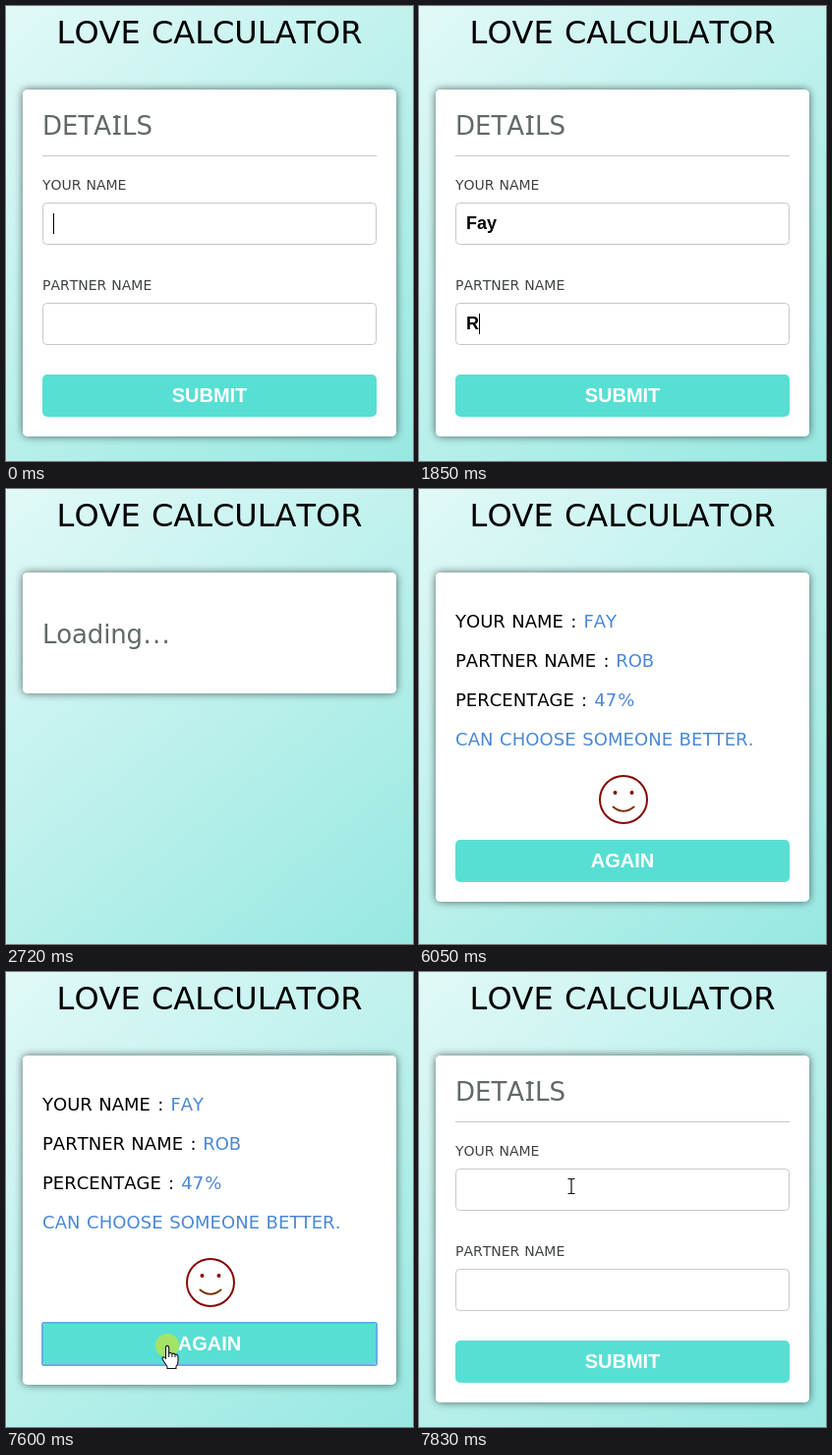
Recreate the animation shown at these times as an HTML page. Size 414 by 463 pixels, loop 7.91 s.

```html
<!DOCTYPE html>
<html lang="en">
<head>
<meta charset="utf-8">
<title>Love calculator</title>
<style>
  html, body { margin: 0; width: 100%; height: 100%; overflow: hidden; }
  body { background: linear-gradient(140deg, #e1f9f7, #97e8e1); }
  svg { display: block; width: 100%; height: 100%; }
  text { font-family: "DejaVu Sans", Verdana, sans-serif; font-kerning: none; word-spacing: .034em; white-space: pre; }
  .title { font-size: 32px; text-anchor: middle; }
  .head { font-size: 26px; fill: #626a68; }
  .label { font-size: 14px; fill: #3f4442; }
  .row { font-size: 18px; }
  .value { font-size: 18px; fill: #4a88d6; }
  .input { font: bold 18px "Liberation Sans", Arial, sans-serif; }
  .action { font: bold 20px "Liberation Sans", Arial, sans-serif; fill: #fff; text-anchor: middle; }
  .box { fill: #fff; stroke: #c8c8c8; }
  .ring { fill: none; stroke: #66aeea; stroke-width: 2; }
  .face { fill: none; stroke: #820a04; stroke-width: 2; stroke-linecap: round; }
  .pointer { fill: #fff; stroke: #111; stroke-width: 1.1; stroke-linejoin: round; }
</style>
</head>
<body>
<svg viewBox="0 0 414 463">
  <defs>
    <filter id="shadow" filterUnits="userSpaceOnUse" x="0" y="60" width="414" height="403">
      <feDropShadow dx="0" dy="0" stdDeviation="4.5" flood-color="#000" flood-opacity=".6"/>
    </filter>
  </defs>
  <text class="title" x="207" y="38">LOVE CALCULATOR</text>
  <rect id="card" x="17" y="85" width="380" height="353" rx="5" fill="#fff" filter="url(#shadow)"/>

  <g id="form">
    <text class="head" x="37" y="131">DETA<tspan dx="1.6">I</tspan><tspan dx="1.6">LS</tspan></text>
    <path d="M109 113h7.6M109 130h7.6" stroke="#626a68" stroke-width="2"/>
    <path d="M37 152.5H377" stroke="#c8c8c8"/>
    <text class="label" x="37" y="187">YOUR NAME</text>
    <rect class="box" x="37.5" y="200.5" width="339" height="42" rx="4"/>
    <text class="input" id="first" x="48" y="227"></text>
    <text class="label" x="37" y="289">PARTNER NAME</text>
    <rect class="box" x="37.5" y="302.5" width="339" height="42" rx="4"/>
    <text class="input" id="second" x="48" y="329"></text>
    <rect id="caret" width="1" height="21"/>
  </g>

  <text id="loading" class="head" x="37" y="157" letter-spacing="-.17">Loading<tspan letter-spacing="1.2" dx=".6">...</tspan></text>

  <g id="result">
    <text class="row" x="37" y="141">YOUR NAME <tspan dx="1">:</tspan></text>
    <text class="value" x="167.4" y="141">FAY</text>
    <text class="row" x="37" y="181">PARTNER NAME <tspan dx="1">:</tspan></text>
    <text class="value" x="200.2" y="181">ROB</text>
    <text class="row" x="37" y="221">PERCENTAGE <tspan dx="1">:</tspan></text>
    <text class="value" x="178.3" y="221">47<tspan dx="1">%</tspan></text>
    <text class="value" x="37" y="261" letter-spacing=".08">CAN CHOOSE SOMEONE BETTER.</text>
    <g class="face">
      <circle cx="208" cy="316" r="24"/>
      <path d="M197.5 323.5Q208 332 218.5 323.5" stroke="#7c3208"/>
      <circle cx="199.5" cy="309" r="2" fill="#820a04" stroke="none"/>
      <circle cx="216.5" cy="309" r="2" fill="#820a04" stroke="none"/>
    </g>
  </g>

  <g id="button">
    <rect x="37" y="375" width="340" height="43" rx="5" fill="#58dfd3"/>
    <text class="action" id="caption" x="207" y="403"></text>
    <rect class="ring" id="ring" x="37" y="375" width="340" height="43" rx="1.5"/>
  </g>

  <circle id="spot" cx="164" cy="380" r="12" fill="#a8e45f" fill-opacity=".95"/>
  <g id="cursor">
    <path id="arrow" class="pointer" d="M0 0V16L3.8 12.5L6.4 18.5L9 17.4L6.5 11.6H11.6Z"/>
    <g id="hand">
      <path class="pointer" d="M-1.5 1.5Q0 -.8 1.7 1.5V8Q3.3 6.6 4.9 8.5Q6.6 7.4 8 9.3Q10.7 8.6 11 11.5V16Q11 19 9 21.5V23.5H0V21.5L-4.7 14.5Q-5.6 12.2 -3.8 11.8Q-2.6 11.8 -1.5 13.5Z"/>
      <path d="M1.7 8V12M4.9 8.5V12M8 9.3V12" stroke="#111" fill="none"/>
    </g>
    <path id="beam" d="M-3.5 -7.5H-1Q0 -7.5 0 -6.5Q0 -7.5 1 -7.5H3.5M0 -6.5V6.5M-3.5 7.5H-1Q0 7.5 0 6.5Q0 7.5 1 7.5H3.5" stroke="#111" stroke-width="1.2" fill="none"/>
  </g>
</svg>
<script>
const LOOP = 7910;
const FOCUS2 = 1240, BLINK = 1790, PRESS = 2320, LOAD = 2720, DONE = 6050;
const ENTER = 7060, CLICK = 7600, RESET = 7680, STEP = 77;
const el = {};
document.querySelectorAll("svg [id]").forEach(n => el[n.id] = n);

const show = (node, on) => node.setAttribute("display", on ? "inline" : "none");
const mix = (a, b, k) => a + (b - a) * k;
const typed = (word, times, t) => word.slice(0, times.filter(at => t >= at).length);

function placeCaret(t) {
  const inFirst = t < FOCUS2;
  const field = inFirst ? el.first : el.second;
  const width = field.textContent ? field.getComputedTextLength() : 0;
  el.caret.setAttribute("x", 48 + Math.round(width));
  el.caret.setAttribute("y", inFirst ? 211 : 313);
  show(el.caret, t < PRESS && !(t >= BLINK && t < 1850));
}

function placeCursor(t) {
  show(el.cursor, t >= ENTER);
  if (t < ENTER) return;
  let x, y, kind;
  if (t < CLICK) {
    const k = Math.min(4, Math.floor((t - ENTER) / STEP)) / 4;
    const ease = k * (2 - k);
    x = mix(105, 164, ease);
    y = mix(451, 380, ease);
    kind = y < 400 ? "hand" : "arrow";
  } else {
    const k = Math.min(3, Math.floor((t - CLICK) / (STEP - 1))) / 3;
    const ease = k * k * (3 - 2 * k);
    x = mix(164, 155, ease);
    y = mix(380, 218, ease);
    kind = k < .5 ? "hand" : "beam";
    if (y > 345 && y < 375) kind = "arrow";
  }
  el.cursor.setAttribute("transform", `translate(${x.toFixed(1)} ${y.toFixed(1)})`);
  for (const name of ["arrow", "hand", "beam"]) show(el[name], name === kind);
}

function draw(t) {
  const loading = t >= LOAD && t < DONE;
  const result = t >= DONE && t < RESET;
  const form = !loading && !result;
  const fresh = t >= RESET;

  show(el.form, form);
  show(el.loading, loading);
  show(el.result, result);
  show(el.button, !loading);
  el.card.setAttribute("height", loading ? 123 : result ? 335 : 353);
  el.button.setAttribute("transform", `translate(0 ${result ? -18 : 0})`);
  el.caption.textContent = result ? "AGAIN" : "SUBMIT";
  show(el.ring, (t >= PRESS && t < LOAD) || (t >= CLICK && t < RESET));
  show(el.spot, t >= CLICK && t < RESET);

  el.first.textContent = fresh ? "" : typed("Fay", [460, 690, 850], t);
  el.second.textContent = fresh ? "" : typed("Rob", [1850, 2020, 2170], t);
  placeCaret(t);
  placeCursor(t);
}

const start = performance.now();
function tick() {
  draw((performance.now() - start) % LOOP);
  requestAnimationFrame(tick);
}
tick();
</script>
</body>
</html>
```
